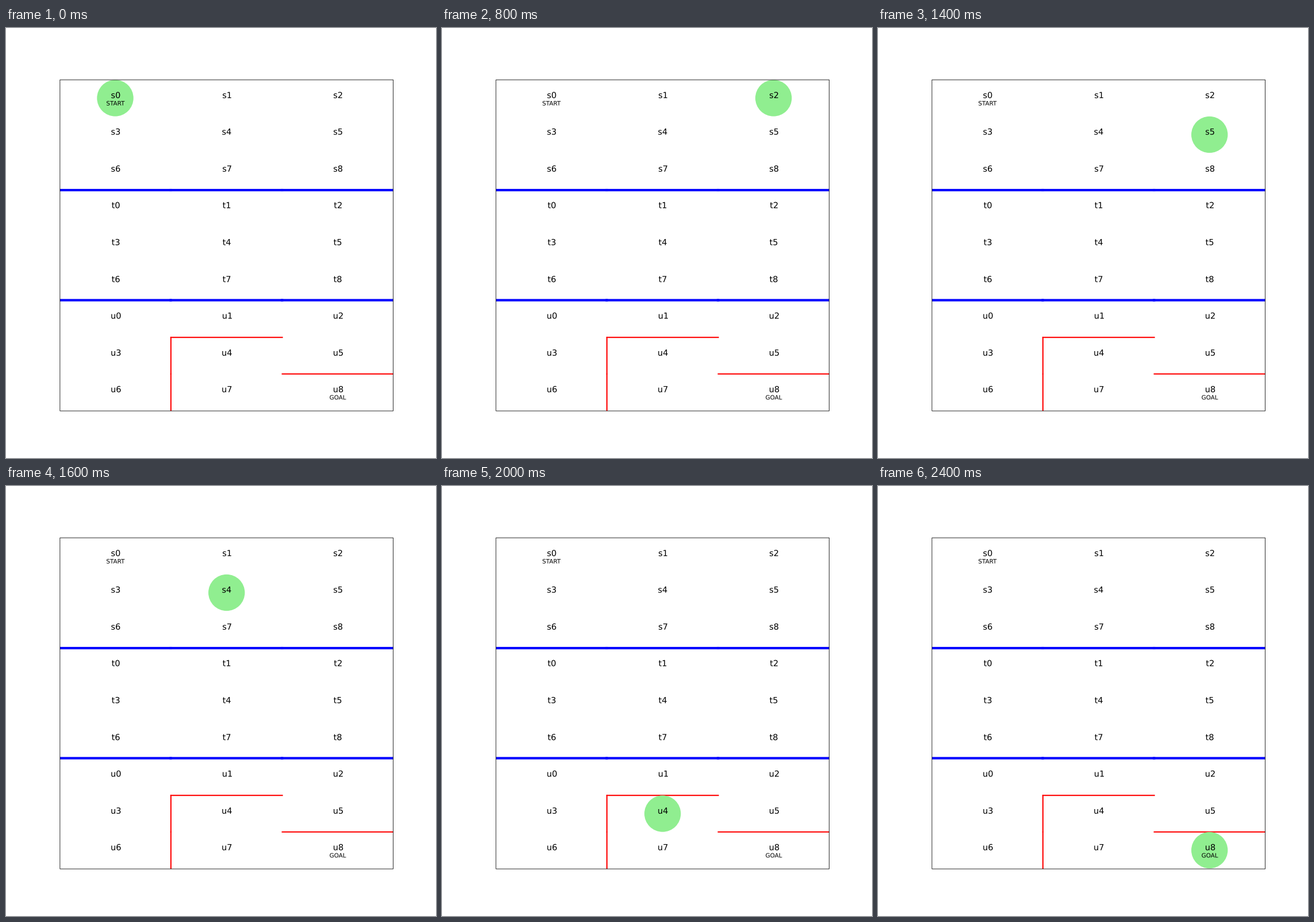
These frames come from a looping animation (748x748 px, 2600 ms). A matplotlib script:

```python
from math import floor

import matplotlib.pyplot as plt
from matplotlib.animation import FuncAnimation
from matplotlib.patches import Circle, PathPatch, Rectangle
from matplotlib.textpath import TextPath
from matplotlib.transforms import Affine2D

plt.rcParams["font.family"] = "DejaVu Sans"

# Layout units: 1000 by 1000 over the stage, y pointing down, 100 per inch
UNITS = 1000
POINT = 100 / 72
LEFT, TOP, WIDTH, HEIGHT = 125, 120, 775, 770
COLS, ROWS = 3, 9
STEP_MS = 200
PATH = "s0 s1 s2 s1 s2 s5 s2 s5 s4 t4 u4 u7 u8".split()


def nearest(value):
    return floor(value + 0.5)


def place(col, row):
    return LEFT + WIDTH * col / COLS, TOP + HEIGHT * row / ROWS


def cell_center(name):
    index = "stu".index(name[0]) * 9 + int(name[1])
    row, col = divmod(index, COLS)
    return col + 0.5, row + 0.5


def agent_center(step):
    return [nearest(v) for v in place(*cell_center(PATH[step]))]


fig = plt.figure(figsize=(10, 10), dpi=74.8, facecolor="white")
ax = fig.add_axes([0, 0, 1, 1])
ax.set_xlim(0, UNITS)
ax.set_ylim(UNITS, 0)
ax.axis("off")

border = ax.add_patch(Rectangle((LEFT + 0.5, TOP + 0.5), WIDTH, HEIGHT, fill=False,
                                edgecolor="black", linewidth=0.8, zorder=2.5,
                                snap=False))


def wall(start, end, color, width):
    # Odd stroke widths sit on half units, even ones on whole units
    half = nearest(width * POINT) % 2 / 2
    points = [[nearest(v) + half for v in place(*p)] for p in (start, end)]
    line, = ax.plot(*zip(*points), color=color, linewidth=width, snap=False)
    line.set_clip_path(border)


def label(col, row, text, size):
    """Centre text on a column with its baseline on a row."""
    x, baseline = place(col, row)
    glyphs = TextPath((0, 0), text, size=size * POINT)
    box = glyphs.get_extents()
    x = nearest(x - box.width / 2 + box.x0) - box.x0
    flip = Affine2D().scale(1, -1).translate(x, nearest(baseline))
    ax.add_patch(PathPatch(flip.transform_path(glyphs), facecolor="black",
                           linewidth=0, zorder=3, snap=False))


# Layer borders
for row in (3, 6):
    for col in range(COLS):
        wall((col, row), (col + 1, row), "blue", 4)

# Walls in the bottom layer
wall((1, 7), (2, 7), "red", 2)
wall((1, 7), (1, 8), "red", 2)
wall((1, 8), (1, 9), "red", 2)
wall((2, 8), (3, 8), "red", 2)

for layer in "stu":
    for number in range(9):
        name = f"{layer}{number}"
        label(*cell_center(name), name, 14)

for name, caption in (("s0", "START"), ("u8", "GOAL")):
    col, row = cell_center(name)
    label(col, row + 0.2, caption, 10)

agent = ax.add_patch(Circle(agent_center(0), 30.5 * POINT, color="lightgreen",
                            linewidth=0, zorder=2.1))


def update(step):
    agent.center = agent_center(step)
    return agent,


anim = FuncAnimation(fig, update, frames=len(PATH), interval=STEP_MS,
                     init_func=lambda: update(0), repeat=True, repeat_delay=0)

plt.show()
```
